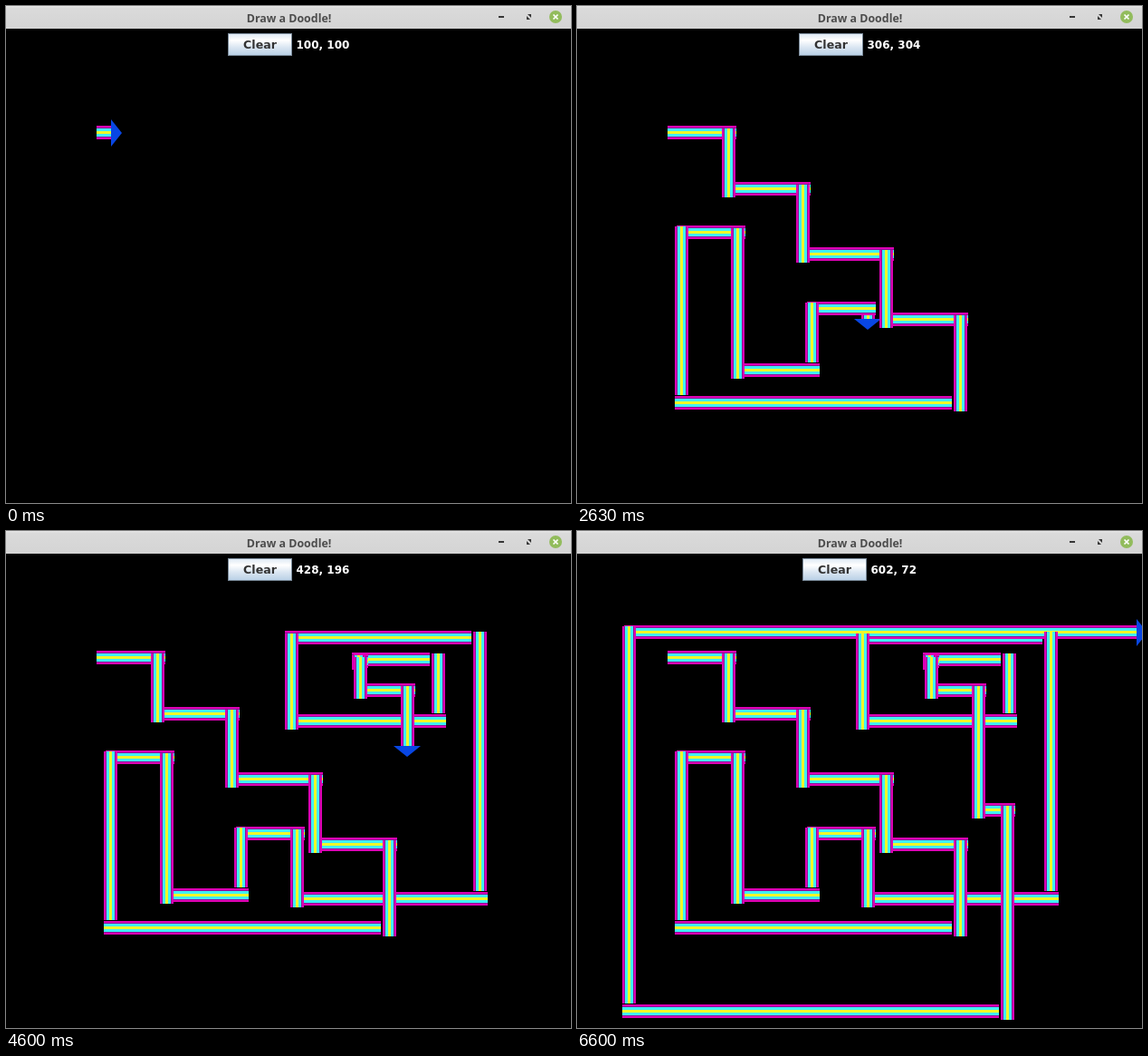
An HTML page for the animation above (6630 ms loop, 624 by 548 pixels).

```html
<!DOCTYPE html>
<html lang="en">
<head>
<meta charset="utf-8">
<title>Draw a Doodle!</title>
<style>
  html, body { margin: 0; width: 100%; height: 100%; overflow: hidden; background: #000; }
  svg { display: block; }
  .title { font: 600 12.4px "Noto Sans", "Open Sans", sans-serif; fill: #4c4c4c; }
  .bold { font: bold 12px "DejaVu Sans", sans-serif; }
</style>
</head>
<body>
<svg width="624" height="548" viewBox="0 0 624 548">
  <defs>
    <linearGradient id="bar" x2="0" y2="1">
      <stop offset="0" stop-color="#e8e8e8"/>
      <stop offset=".1" stop-color="#dadada"/>
      <stop offset="1" stop-color="#d4d4d4"/>
    </linearGradient>
    <linearGradient id="face" x2="0" y2="1">
      <stop offset="0" stop-color="#dde8f3"/>
      <stop offset=".3" stop-color="#ffffff"/>
      <stop offset=".6" stop-color="#dde8f3"/>
      <stop offset="1" stop-color="#b8cfe5"/>
    </linearGradient>
    <linearGradient id="across" x2="0" y2="1"></linearGradient>
    <linearGradient id="down"></linearGradient>
  </defs>
  <rect width="624" height="548"/>
  <g id="arrow">
    <rect id="tail"/>
    <path id="head" fill="#0846e4"/>
  </g>
  <g id="trails"><g id="rows"></g><g id="columns"></g></g>

  <rect width="624" height="25" fill="url(#bar)"/>
  <text class="title" x="312.5" y="18" text-anchor="middle">Draw a Doodle!</text>
  <path d="M544 11h6v2h-6zM575 15v-4l4 4zM576 9h4v4z" fill="#363636"/>
  <circle cx="607" cy="12" r="7" fill="#92bc5c"/>
  <path d="M604.5 9.5l5 5m0-5l-5 5" stroke="#fff" stroke-width="1.7"/>

  <g id="button">
    <rect x=".5" y="30.5" width="70" height="24" fill="url(#face)" stroke="#7a8a99"/>
    <text class="bold" style="font-size:12.6px" x="35.5" y="47" text-anchor="middle" fill="#333">Clear</text>
  </g>
  <text class="bold" id="label" y="47" fill="#fff"></text>
</svg>
<script>
const LOOP = 6630, STEP = 10, TURN = 8, TOP = 25;
const TAIL = 16, BAND = 15, HOLD = 80, REPEAT = 1 / 0.16;
const $ = id => document.getElementById(id);

function make(tag, attrs, parent) {
  const node = document.createElementNS("http://www.w3.org/2000/svg", tag);
  set(node, attrs);
  return parent.appendChild(node);
}
function set(node, attrs) {
  for (const key in attrs) node.setAttribute(key, attrs[key]);
}

// Rainbow cross-section: colour and thickness in pixels.
const bands = [
  ["#dc00b4", 2], ["#8c1098", 1], ["#40f0f4", 3], ["#f0f828", 3],
  ["#40f0f4", 3], ["#8c1098", 1], ["#dc00b4", 2]
];
for (const id of ["across", "down"]) {
  let edge = 0;
  for (const [color, size] of bands) {
    make("stop", { offset: edge / BAND, "stop-color": color }, $(id));
    edge += size;
    make("stop", { offset: edge / BAND, "stop-color": color }, $(id));
  }
}

const headings = { R: [1, 0], L: [-1, 0], D: [0, 1], U: [0, -1] };
const heads = {
  R: "M16 0L28 15L16 30z", L: "M12 0L0 15L12 30z",
  D: "M0 16L15 28L30 16z", U: "M0 12L15 0L30 12z"
};

// Key presses: direction, steps, time of the first step.
const presses = [
  ["R", 6, 25], ["D", 7, 225], ["R", 9, 420], ["D", 8, 625], ["R", 10, 780],
  ["D", 8, 950], ["R", 9, 1105], ["D", 10, 1255], ["L", 30, 1392], ["U", 18, 1652],
  ["R", 7, 1870], ["D", 16, 2000], ["R", 9, 2190], ["U", 6, 2335], ["R", 7, 2460],
  ["D", 8, 2590], ["R", 21, 2728], ["U", 28, 2947], ["L", 20, 3210], ["D", 10, 3422],
  ["R", 17, 3572], ["U", 6, 3766], ["L", 8, 3890], ["D", 1, 4045], ["R", 1, 4125],
  ["D", 4, 4200], ["R", 6, 4335], ["D", 14, 4490], ["R", 4, 4690], ["D", 23, 4850],
  ["L", 41, 5120], ["U", 41, 5458], ["R", 56, 5795]
];

const points = [{ x: 100, y: 100, dir: "R", run: 0, time: 0 }];
const runs = [];
presses.forEach(([dir, count, start], run) => {
  const [dx, dy] = headings[dir];
  let { x, y } = points[points.length - 1];
  if (run) {
    if (dx) y -= TURN; else x -= TURN;
  }
  for (let k = 0; k < count; k++) {
    x += dx * STEP;
    y += dy * STEP;
    const time = start + (k ? HOLD + (k - 1) * REPEAT : 0);
    points.push({ x, y, dir, run, time });
  }
  const first = points.find(p => p.run === run);
  const node = make("rect", {}, dx ? $("rows") : $("columns"));
  runs.push({ first, end: points[points.length - 1], node });
});

// Rainbow strip covering the stamps from a to b.
function strip(node, a, b) {
  const flat = headings[a.dir][0] !== 0;
  const x = Math.min(a.x, b.x), y = Math.min(a.y, b.y) + TOP;
  const length = Math.abs(a.x - b.x) + Math.abs(a.y - b.y) + TAIL;
  set(node, flat
    ? { x, y: y + 7, width: length, height: BAND, fill: "url(#across)" }
    : { x: x + 8, y, width: BAND, height: length, fill: "url(#down)" });
}

function draw(t) {
  let now = 0;
  while (now + 1 < points.length && points[now + 1].time <= t) now++;
  const p = points[now], last = points[now - 1];

  runs.forEach(({ first, end, node }, run) => {
    const visible = last && run <= last.run;
    node.style.display = visible ? "" : "none";
    if (visible) strip(node, first, run === last.run ? last : end);
  });

  const base = {
    x: p.x + (p.dir === "L" ? 12 : 0),
    y: p.y + (p.dir === "U" ? 12 : 0),
    dir: p.dir
  };
  strip($("tail"), base, base);
  set($("head"), { d: heads[p.dir], transform: `translate(${p.x} ${p.y + TOP})` });

  const text = `${p.x}, ${p.y}`;
  const left = 312 - (76 + 8 * text.length - 6) / 2;
  set($("button"), { transform: `translate(${left} 0)` });
  set($("label"), { x: left + 75.5 });
  $("label").textContent = text;
}

const began = performance.now();
function tick() {
  draw((performance.now() - began) % LOOP);
  requestAnimationFrame(tick);
}
tick();
</script>
</body>
</html>
```
